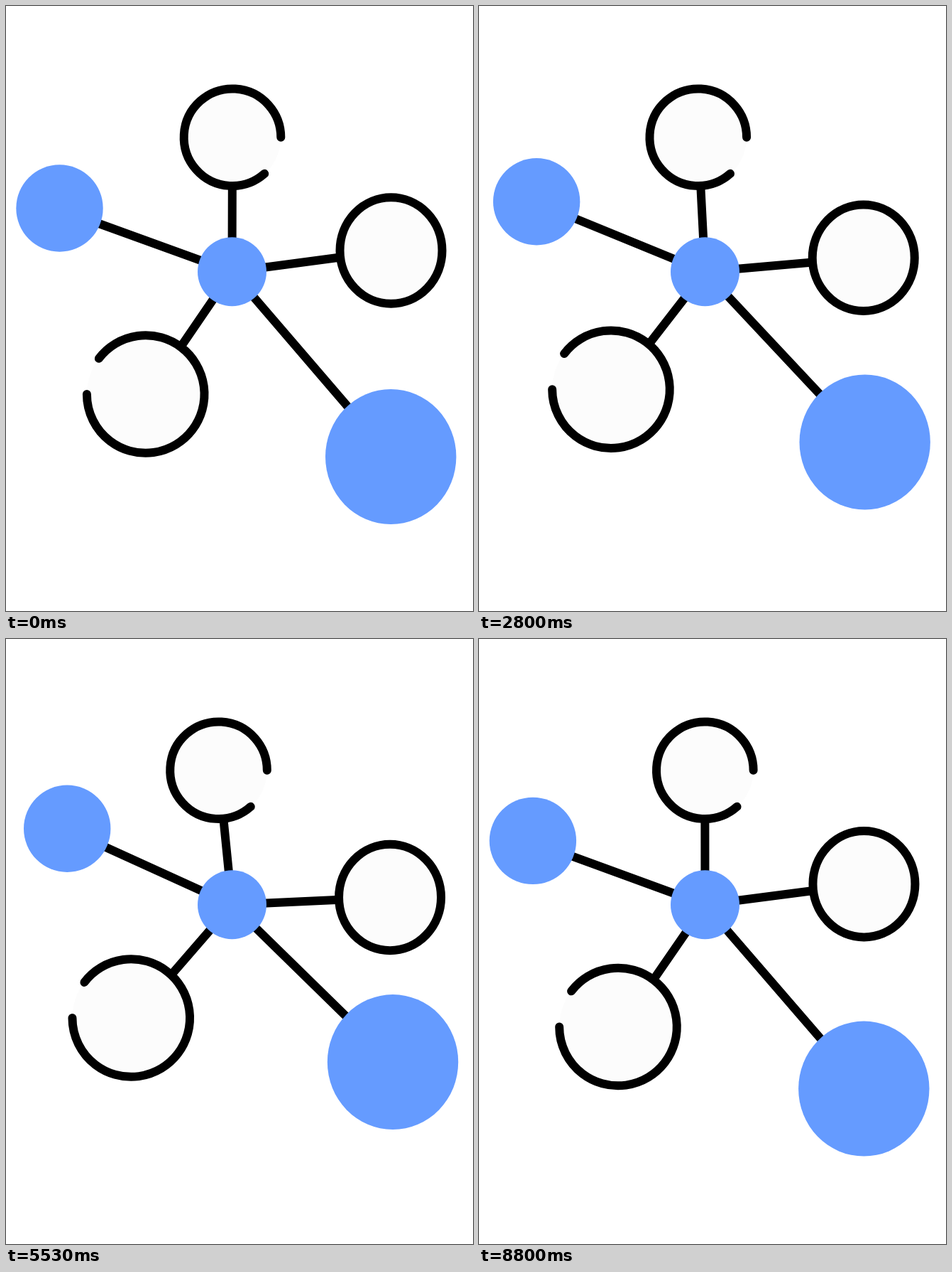
Recreate the animation shown at these times as an HTML page with a canvas. Size 658 by 851 pixels, loop 8.87 s.

```html
<!DOCTYPE html>
<html lang="en">
<head>
<meta charset="utf-8">
<title>Network</title>
<style>
  html, body { margin: 0; width: 100%; height: 100%; overflow: hidden; background: #fff; }
  canvas { display: block; }
</style>
</head>
<body>
<canvas id="stage" width="658" height="851"></canvas>
<script>
const ctx = document.getElementById('stage').getContext('2d');
const BLUE = '#659bff', PALE = '#fcfcfc';
const LOOP = 8870, SWING = 33.5;
const hub = { x: 318.5, y: 373.8, r: 48.5 };

// Each node drifts by (dx, dy); aim shifts where its spoke points.
// arc is the drawn part of a ring, in degrees clockwise.
const nodes = [
  { x: 319, y: 184.7, dx: -20, dy: 0, rx: 68.3, ry: 68.3, arc: [48.5, 360] },
  { x: 542.5, y: 344, dx: -1.5, dy: 20, rx: 72, ry: 74.7, arc: [0, 360] },
  { x: 196.7, y: 546, dx: -21, dy: -13.3, rx: 82.8, ry: 82.8, arc: [217.3, 540], aim: [4, 0] },
  { x: 75.5, y: 284.5, dx: 11, dy: -18.2, rx: 61.2, ry: 61.2, aim: [0, 1.5] },
  { x: 542.2, y: 634, dx: 2.9, dy: -40, rx: 92.2, ry: 95 }
];

function disc(x, y, rx, ry, color) {
  ctx.beginPath();
  ctx.ellipse(x, y, rx, ry, 0, 0, 2 * Math.PI);
  ctx.fillStyle = color;
  ctx.fill();
}

function drawNode(n, swing) {
  const x = n.x + n.dx * swing, y = n.y + n.dy * swing;
  const [ax, ay] = n.aim || [0, 0];
  ctx.beginPath();
  ctx.moveTo(hub.x, hub.y);
  ctx.lineTo(x + ax, y + ay);
  ctx.stroke();
  disc(x, y, n.rx, n.ry, n.arc ? PALE : BLUE);
  if (!n.arc) return;
  const [from, to] = n.arc.map(a => a * Math.PI / 180);
  ctx.beginPath();
  ctx.ellipse(x, y, n.rx, n.ry, 0, from, to);
  ctx.stroke();
}

// Steps last 130 and 70 ms in turn; the pose advances about 1.5 units per step.
function swingAt(t) {
  const step = 2 * Math.floor(t / 200) + (t % 200 >= 130 ? 1 : 0);
  const pose = Math.round(step * 1.494 + 0.3);
  return (1 - Math.cos(2 * Math.PI * pose / SWING)) / 2;
}

function draw(t) {
  ctx.fillStyle = '#fff';
  ctx.fillRect(0, 0, 658, 851);
  ctx.strokeStyle = '#000';
  ctx.lineWidth = 12;
  ctx.lineCap = 'round';
  const swing = swingAt(t);
  nodes.forEach(n => drawNode(n, swing));
  disc(hub.x, hub.y, hub.r, hub.r, BLUE);
}

const start = performance.now();
function tick() {
  draw((performance.now() - start) % LOOP);
  requestAnimationFrame(tick);
}
tick();
</script>
</body>
</html>
```
